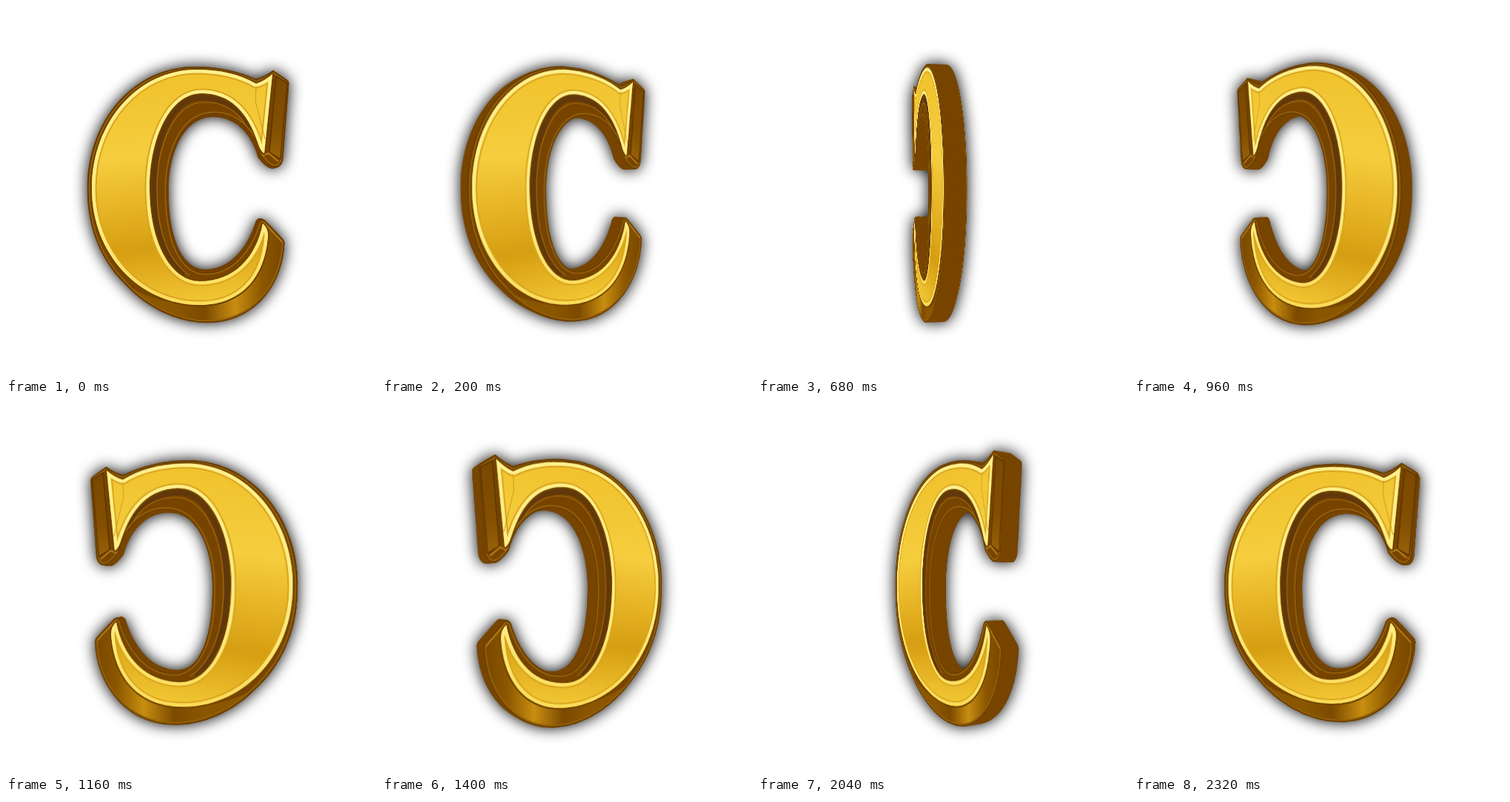
Animation of 500 by 500 pixels, one loop 2.36 s. Source, as an HTML page:

```html
<!DOCTYPE html>
<html lang="en">
<head>
<meta charset="utf-8">
<title>Spinning gold letter</title>
<style>
  html, body { margin: 0; width: 100%; height: 100%; overflow: hidden; background: #fff; }
  #stage { position: relative; width: 500px; height: 500px; perspective: 720px; filter: url(#glow); }
  #letter { position: absolute; inset: 0; transform-style: preserve-3d; }
  #letter svg { position: absolute; left: 0; top: 0; width: 500px; height: 500px; }
  #defs { position: absolute; }
</style>
</head>
<body>
<svg id="defs" width="0" height="0">
  <defs>
    <filter id="glow" color-interpolation-filters="sRGB">
      <feDropShadow dx="0" dy="0" stdDeviation="10" flood-color="#000"/>
    </filter>
    <linearGradient id="gold" gradientUnits="userSpaceOnUse" x1="220" y1="86" x2="260" y2="404">
      <stop offset="0" stop-color="#f0c22c"/>
      <stop offset=".35" stop-color="#f5cd3e"/>
      <stop offset=".52" stop-color="#e9b829"/>
      <stop offset=".74" stop-color="#d69e12"/>
      <stop offset="1" stop-color="#f3c835"/>
    </linearGradient>
    <linearGradient id="shine" gradientUnits="userSpaceOnUse" x1="0" y1="86" x2="0" y2="404">
      <stop offset="0" stop-color="#fff08c"/>
      <stop offset=".65" stop-color="#ffec80"/>
      <stop offset="1" stop-color="#fbdc58"/>
    </linearGradient>
    <linearGradient id="under" gradientUnits="userSpaceOnUse" x1="150" y1="0" x2="378" y2="0">
      <stop offset="0" stop-color="#8a5800"/>
      <stop offset=".35" stop-color="#8a5600"/>
      <stop offset=".52" stop-color="#7c4a00"/>
      <stop offset=".7" stop-color="#c78e10"/>
      <stop offset=".86" stop-color="#8c5700"/>
      <stop offset="1" stop-color="#754500"/>
    </linearGradient>
    <linearGradient id="serif" gradientUnits="userSpaceOnUse" x1="0" y1="95" x2="0" y2="212">
      <stop offset="0" stop-color="#7a4800"/>
      <stop offset=".6" stop-color="#834f02"/>
      <stop offset="1" stop-color="#9a6408"/>
    </linearGradient>

    <path id="body" d="M361 87L380 100Q383 102 382 107L374 209Q371 219 362 218Q355 217 344 203
      C336 172 314 146 281 146C240 146 218 195 218 250C218 318 238 360 270 360
      C306 360 330 328 341 292Q345 286 350 290L374 315Q377 318 376 324
      C372 380 334 428 272 428C232 428 190 408 160 375C125 340 110 295 110 247
      C110 155 172 82 256 82C286 82 314 88 338 99Q352 94 361 87Z"/>
    <path id="front" d="M360 92L349 199Q344 197 340 184C326 142 302 118 264 118
      C222 118 194 178 194 246C194 318 222 372 262 372C308 372 338 340 347 294
      Q354 300 354 310C350 370 315 404 262 404C180 404 116 335 116 247
      C116 155 180 86 257 86C290 86 315 92 338 105Q350 101 360 92Z"/>
    <clipPath id="frontClip"><use href="#front"/></clipPath>
    <clipPath id="bodyClip"><use href="#body"/></clipPath>

    <g id="face" fill="none" stroke-linejoin="round">
      <use href="#body" fill="#774400"/>
      <g clip-path="url(#bodyClip)">
        <path fill="url(#under)" d="M349 289L378 318C374 380 334 430 272 430C232 430 190 410 160 375
          C190 396 230 404 262 404C315 404 352 370 353 305Z"/>
        <path stroke="#61380a" stroke-width="9" d="M341 190C328 146 304 123 264 123
          C224 123 199 180 199 246C199 300 214 345 240 364"/>
        <path stroke="#a36c10" stroke-width="1.2" d="M338 192C326 154 306 130 268 130
          C228 130 204 186 204 248C204 305 220 346 248 364"/>
        <use href="#body" stroke="#93600a" stroke-width="7"/>
        <use href="#body" stroke="#643800" stroke-width="3"/>
        <path fill="url(#serif)" stroke="#5d3500" stroke-width="1.5" d="M365 95L380 104L371 207L356 198Z"/>
        <path stroke="#b67e18" stroke-width="2" d="M347 202L355 199L368 210"/>
        <path stroke="#b67e18" stroke-width="1.5" d="M348 292L373 319"/>
      </g>
      <use href="#front" fill="url(#gold)" stroke="#6e4200" stroke-width="4"/>
      <g clip-path="url(#frontClip)">
        <use href="#front" stroke="#d9a41d" stroke-width="13"/>
        <use href="#front" stroke="url(#shine)" stroke-width="9"/>
        <path stroke="#d09a18" d="M338 108L337 128L350 180"/>
      </g>
    </g>
  </defs>
</svg>
<div id="stage"><div id="letter"></div></div>
<script>
  const DEPTH = 25, STEP_MS = 40, STEPS = 59, DEG_PER_STEP = 5.93;
  const letter = document.getElementById('letter');

  // Decorated faces at both ends, plain silhouettes in between.
  for (let z = 0; z <= DEPTH; z++) {
    const part = z % DEPTH ? 'body' : 'face';
    letter.insertAdjacentHTML('beforeend',
      `<svg viewBox="0 0 500 500" fill="#774400" style="transform:translateZ(${-z}px)"><use href="#${part}"/></svg>`);
  }

  function draw() {
    const step = Math.floor(performance.now() / STEP_MS) % STEPS;
    letter.style.transform = `rotateY(${step * DEG_PER_STEP}deg)`;
    requestAnimationFrame(draw);
  }
  draw();
</script>
</body>
</html>
```
